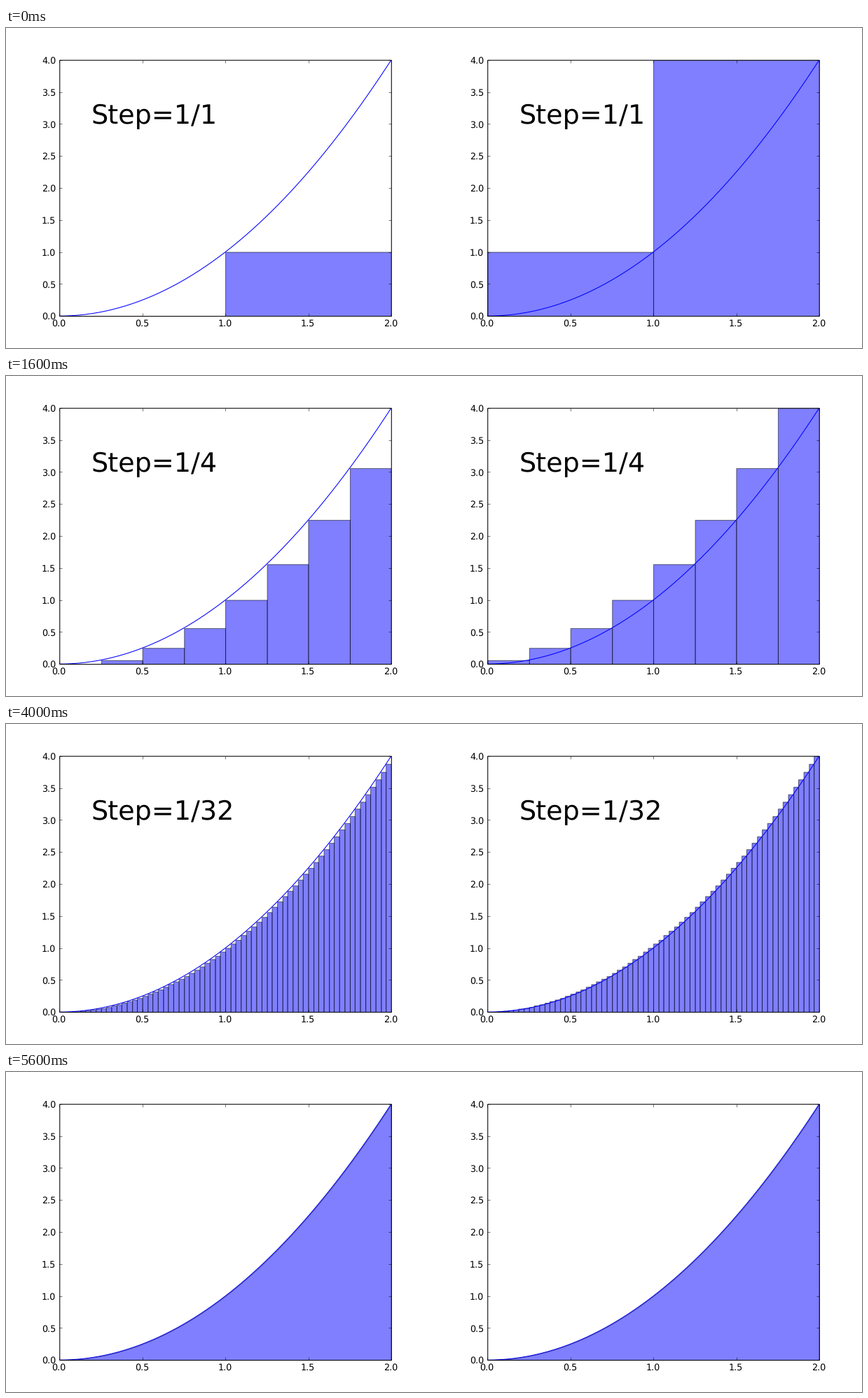
These frames come from a looping animation (1222 px wide and 458 px high, 6.4 s). A matplotlib script:

```python
import numpy as np
import matplotlib.pyplot as plt
from matplotlib.animation import FuncAnimation
from matplotlib.patches import Rectangle
from matplotlib.transforms import ScaledTranslation

W, H, DPI = 1222, 458, 64
PT = W / 16 / DPI  # scales point sizes to two 8-inch panels side by side
BEARING = 0.066    # blank left of the first glyph, in ems
STEPS = [1, 2, 4, 8, 16, 32, 64]

plt.rcParams.update({
    "font.family": "DejaVu Sans",
    "text.hinting": "none",
    "axes.axisbelow": False,
})

fig = plt.figure(figsize=(W / DPI, H / DPI), dpi=DPI, facecolor="white")
curve_x = np.linspace(0, 2, 201)


# Each panel is laid out on an 800x600 grid: 310 cells per x unit, 120 per y
# unit. Straight lines run through the middle of a cell.
def snap_x(x):
    return (np.floor(x * 310 + 0.5) + 0.5) / 310


def snap_y(y):
    return -(np.floor(0.5 - y * 120) + 0.5) / 120


def align_ink(text):
    """Shift a text left so that its ink, not its origin, is aligned."""
    shift = -BEARING * text.get_fontsize() / 72
    text.set_transform(text.get_transform()
                       + ScaledTranslation(shift, 0, fig.dpi_scale_trans))


def make_panel(left):
    ax = fig.add_axes([left + 0.0625, 0.1, 0.3875, 0.8])
    ax.set(xlim=(0, 2), ylim=(0, 4),
           xticks=np.arange(0, 2.1, 0.5), yticks=np.arange(0, 4.1, 0.5))
    ax.xaxis.set_major_formatter("{x:.1f}")
    ax.yaxis.set_major_formatter("{x:.1f}")
    ax.tick_params(direction="in", top=True, right=True, length=4 * PT,
                   width=0.5 * PT, pad=4 * PT, labelsize=12 * PT)
    ax.spines[:].set_visible(False)
    x0, x1 = snap_x(np.array([0, 2]))
    y0, y1 = snap_y(np.array([0, 4]))
    ax.add_patch(Rectangle((x0, y0), x1 - x0, y1 - y0, fill=False, lw=PT,
                           snap=False, clip_on=False, zorder=2.5))
    ax.plot(curve_x, curve_x**2, color="blue", lw=PT)
    title = ax.text(0.2, 3, "", fontsize=36 * PT)
    for text in [title, *ax.get_xticklabels(), *ax.get_yticklabels()]:
        align_ink(text)
    return ax, title


panels = [make_panel(0), make_panel(0.5)]
style = dict(facecolor="blue", edgecolor="black", alpha=0.5, linewidth=PT)
shapes = []


def draw(i):
    while shapes:
        shapes.pop().remove()
    for side, (ax, title) in enumerate(panels):
        if i == len(STEPS):
            title.set_text("")
            shapes.append(ax.fill_between(curve_x, curve_x**2, **style))
            continue
        n = STEPS[i]
        title.set_text(f"Step=1/{n}")
        # left panel: lower sums, right panel: upper sums
        x = np.arange(2 * n + 1) / n
        edges = snap_x(x)
        base = snap_y(0)
        tops = snap_y((x[:-1] + side / n)**2)
        shapes.append(ax.bar(edges[:-1], tops - base, np.diff(edges), base,
                             align="edge", snap=False, **style))
    ax_limits()
    return []


def ax_limits():
    for ax, _ in panels:
        ax.set(xlim=(0, 2), ylim=(0, 4))


anim = FuncAnimation(fig, draw, frames=len(STEPS) + 1, interval=800,
                     repeat=True, repeat_delay=0)
plt.show()
```
